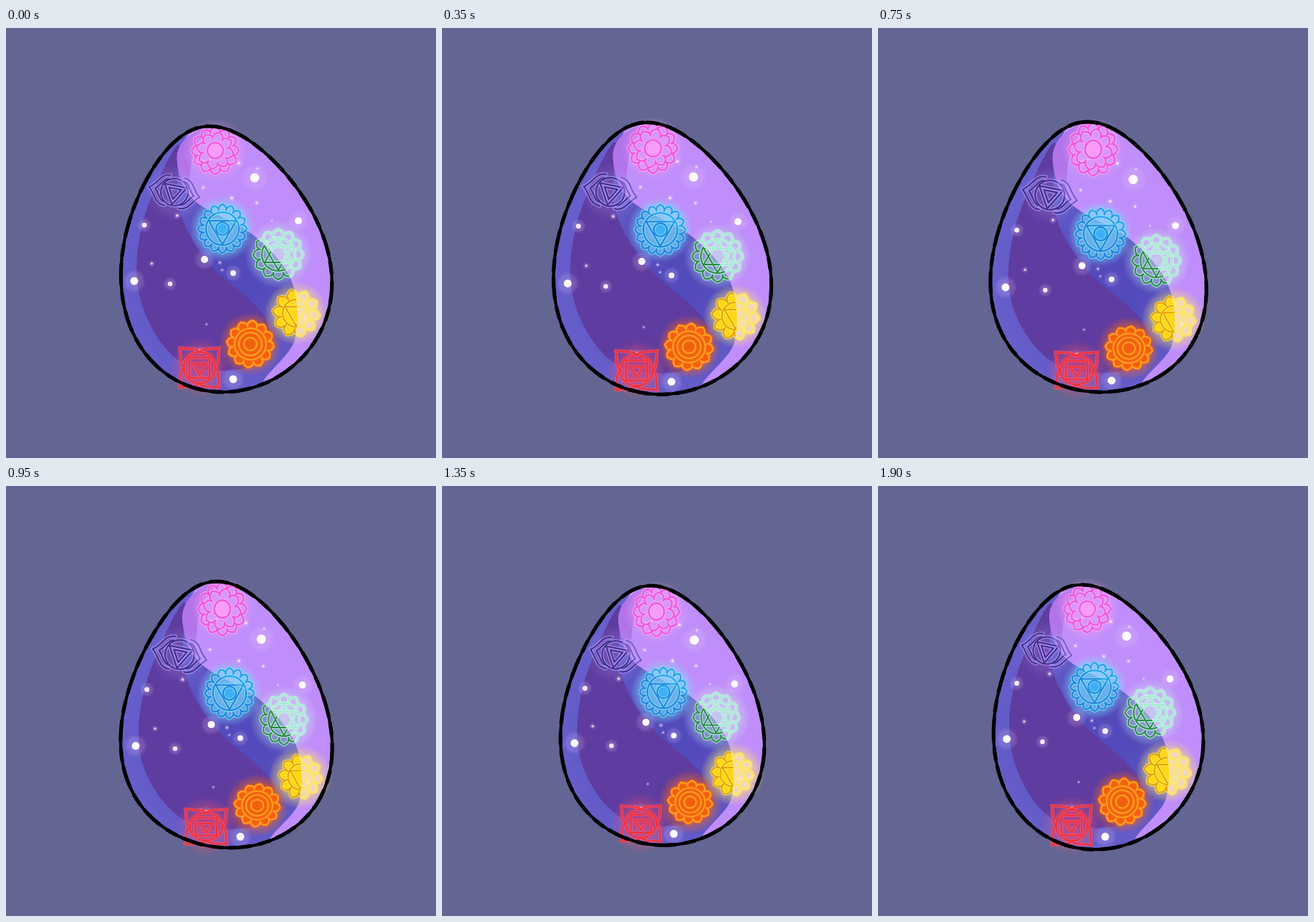
An HTML page with a canvas for the animation above (1.95 s loop, 600x600 px).

```html
<!DOCTYPE html>
<html>
<head>
<meta charset="utf-8">
<style>
html, body { margin: 0; height: 100%; overflow: hidden; background: #636593; }
canvas { display: block; }
</style>
</head>
<body>
<canvas id="stage" width="600" height="600"></canvas>
<script>
const c = document.getElementById('stage').getContext('2d');
const { PI, sin, cos, sqrt } = Math, TAU = PI * 2;
const LOOP = 1950, STEP = 50, MIDX = 307.5, MIDY = 322.5, RX = 147, RY = 185.5;
const range = (n, f) => Array.from({ length: n }, (_, i) => f(i));

// Egg edge at height v (-1 top, 1 bottom) on the given side
function edge(v, side) {
  const half = 145 * sqrt(1 - v * v) * (1 + .185 * v - .07 * v * v);
  return [306.5 + 9 * v - 13 * v * v + side * half, MIDY + RY * v];
}
const EGG = range(48, i => {
  const a = i * TAU / 48;
  return edge(-cos(a), Math.sign(sin(a)));
});

// Key points of the smooth colour areas
const LIGHT = [[290, 130], [250, 155], [239, 188], [262, 240], [345, 289], [398, 352], [403, 435], [360, 505], [500, 500], [500, 120]];
const SHADE = [[240, 163], [190, 275], [188, 380], [243, 465], [340, 472], [364, 408], [282, 327], [241, 250]];
const RIM = [[239, 188], [250, 155], [298, 130], [264, 165], [253, 228]];

// The large stars stay put, the dust is scattered
const BIG = [[347, 209, 6.5], [408, 269, 5], [277, 323, 5], [179, 353, 5.5], [317, 490, 5.5], [193, 275, 3.5], [317, 342, 4], [229, 357, 3.3]];
let seed = 11;
const rnd = () => (seed = seed * 16807 % 2147483647) / 2147483647;
const DUST = range(17, () => {
  const v = rnd() * 1.5 - .75, [l, y] = edge(v, -1), [r] = edge(v, 1);
  return [l + (r - l) * (.06 + .88 * rnd()), y, 1 + 1.7 * rnd() ** 2];
});
const STARS = [...BIG, ...DUST];

// Separable swell: x and y are each bent by a quadratic
let swing = 0, lift = 0;
const X = x => { const u = (x - MIDX) / RX; return x + 5.3 * swing * u + 5 * lift * (1 - u * u); };
const Y = y => { const v = (y - MIDY) / RY; return y + 4.7 * swing * v + lift * (6.7 * (1 - v * v) - 1.75); };

// Closed smooth curve through the bent points
function blob(points) {
  const path = new Path2D(), n = points.length;
  const p = points.map(([x, y]) => [X(x), Y(y)]), at = i => p[(i + n) % n];
  path.moveTo(...p[0]);
  for (let i = 0; i < n; i++) {
    const [a, b, d, e] = [at(i - 1), at(i), at(i + 1), at(i + 2)];
    path.bezierCurveTo(b[0] + (d[0] - a[0]) / 6, b[1] + (d[1] - a[1]) / 6,
      d[0] - (e[0] - b[0]) / 6, d[1] - (e[1] - b[1]) / 6, ...d);
  }
  return path;
}

function fill(path, style) { c.fillStyle = style; c.fill(path); }

function dot(x, y, r, style) {
  c.fillStyle = style;
  c.beginPath(); c.arc(X(x), Y(y), r, 0, TAU); c.fill();
}

function glow(x, y, r, rgb, a) {
  const g = c.createRadialGradient(X(x), Y(y), 0, X(x), Y(y), r);
  g.addColorStop(0, `rgba(${rgb},${a})`);
  g.addColorStop(.65, `rgba(${rgb},${a * .75})`);
  g.addColorStop(1, `rgba(${rgb},0)`);
  dot(x, y, r, g);
}

// Parts of the emblems, drawn around the origin
function ring(r, solid) {
  c.beginPath(); c.arc(0, 0, r, 0, TAU);
  if (solid) c.fill();
  c.stroke();
}

function poly(n, r, turn) {
  c.beginPath();
  for (let i = 0; i < n; i++) c.lineTo(r * cos(turn + i * TAU / n), r * sin(turn + i * TAU / n));
  c.closePath(); c.stroke();
}

function lotus(n, r1, r2, turn = 0, solid = false) {
  const h = PI / n, mid = r1 + (r2 - r1) * .75, at = (r, a) => [r * cos(a), r * sin(a)];
  c.beginPath();
  c.moveTo(...at(r1, turn - h));
  for (let i = 0; i < n; i++) {
    const a = turn + i * 2 * h;
    c.quadraticCurveTo(...at(mid, a - h), ...at(r2, a));
    c.quadraticCurveTo(...at(mid, a + h), ...at(r1, a + h));
  }
  c.closePath();
  if (solid) c.fill();
  c.stroke();
}

function eye() {
  for (const side of [-1, 1]) for (const s of [1, .76]) {
    c.beginPath(); c.moveTo(side * 10, -22 * s);
    c.bezierCurveTo(side * 24 * s, -22 * s, side * 24 * s, -8, side * 36 * s, 0);
    c.bezierCurveTo(side * 27 * s, 6, side * 24 * s, 22 * s, side * 10, 21 * s);
    c.stroke();
  }
}

function corners() {
  for (let i = 0; i < 4; i++) {
    c.beginPath(); c.moveTo(0, -21);
    c.bezierCurveTo(4, -29, 17, -25, 28, -28);
    c.bezierCurveTo(25, -17, 29, -4, 21, 0);
    c.stroke();
    c.rotate(TAU / 4);
  }
}

const DOWN = PI / 2, UP = -DOWN;
const EMBLEMS = [
  { x: 292, y: 171, r: 33, line: '#ee58d8', pale: '#ee58d8', body: '#f79cf8', rgb: '255,165,250', a: .45,
    draw() { lotus(12, 25, 33); lotus(8, 17, 26, .2); ring(11, true); } },
  { x: 235, y: 229, r: 30, line: '#40308a', pale: '#7a5bc4', body: '#5442a0', rgb: '185,160,255', a: .2,
    draw() { c.rotate(.2); eye(); ring(19); poly(3, 18, DOWN); poly(3, 10, DOWN); } },
  { x: 302, y: 280, r: 34, line: '#2581dc', pale: '#2c9cec', body: '#3fb0f4', rgb: '120,230,255', a: .75,
    draw() { lotus(16, 26, 34); ring(23); poly(3, 22, DOWN); ring(9, true); } },
  { x: 380, y: 316, r: 35, line: '#2a8b45', pale: '#a5ecd2', body: '#58b978', rgb: '205,255,232', a: .5,
    draw() { lotus(12, 26, 35); ring(23); poly(3, 22, UP); poly(3, 22, DOWN); } },
  { x: 405, y: 398, r: 33, line: '#e8a000', pale: '#ffe46a', body: '#ffd814', paleBody: 'rgba(255,238,205,.5)', rgb: '255,235,105', a: .7,
    draw() { lotus(10, 21, 33, .1, true); ring(19); poly(3, 18, DOWN); } },
  { x: 341, y: 441, r: 33, line: '#ffa51e', pale: '#ffa51e', body: '#f2600f', rgb: '255,105,20', a: .7,
    draw() { lotus(12, 25, 33, .1, true); ring(22); ring(16); ring(9, true); } },
  { x: 270, y: 474, r: 31, line: '#f0303c', pale: '#f0303c', body: 'rgba(205,60,125,.4)', rgb: '255,85,105', a: .4,
    draw() { corners(); ring(22, true); poly(4, 20, PI / 4); poly(3, 10, DOWN); } }
];

// A wide soft pass carries the fills, a thin pass the lines
function emblem(e, pale) {
  const { x, y } = e;
  const passes = [[4.8, `rgba(${e.rgb},.6)`, pale && e.paleBody || e.body], [2, pale ? e.pale : e.line, 'transparent']];
  c.lineJoin = 'round';
  for (const [width, line, body] of passes) {
    c.save();
    c.translate(X(x), Y(y));
    c.scale((X(x + 30) - X(x - 30)) / 60, (Y(y + 30) - Y(y - 30)) / 60);
    c.lineWidth = width;
    c.strokeStyle = line;
    c.fillStyle = body;
    e.draw();
    c.restore();
  }
}

function paint() {
  const egg = blob(EGG), light = blob(LIGHT);
  c.fillStyle = '#636593';
  c.fillRect(0, 0, 600, 600);

  c.save();
  c.clip(egg);
  const base = c.createRadialGradient(X(325), Y(345), 30, X(325), Y(345), 175);
  base.addColorStop(0, '#534abb');
  base.addColorStop(1, '#675fcb');
  fill(egg, base);
  fill(blob(SHADE), '#5f3c9f');
  fill(light, '#c08efa');
  fill(blob(RIM), '#b274e8');
  for (const [x, y, r] of STARS) {
    glow(x, y, r * 3, '225,200,255', .25);
    dot(x, y, r, `rgba(255,250,255,${Math.min(1, .55 + r / 10)})`);
  }
  c.restore();

  for (const e of EMBLEMS) glow(e.x, e.y, e.r * 1.35, e.rgb, e.a);

  // Emblems turn pale where they cross the light side
  const dark = new Path2D();
  dark.rect(0, 0, 600, 600);
  dark.addPath(light);
  for (const pale of [false, true]) {
    c.save();
    if (pale) c.clip(light); else c.clip(dark, 'evenodd');
    for (const e of EMBLEMS) emblem(e, pale);
    c.restore();
  }

  c.strokeStyle = '#000';
  c.lineCap = c.lineJoin = 'round';
  c.lineWidth = 4.2;
  c.stroke(egg);
  c.lineWidth = 5.2;
  c.setLineDash([15, 13, 28, 11]);
  c.stroke(egg);
  c.setLineDash([]);
}

const start = performance.now();
function frame() {
  const t = Math.floor((performance.now() - start) % LOOP / STEP) * STEP;
  const a = TAU * t / LOOP;
  swing = sin(a);
  lift = 1 - cos(a);
  paint();
  requestAnimationFrame(frame);
}
frame();
</script>
</body>
</html>
```
